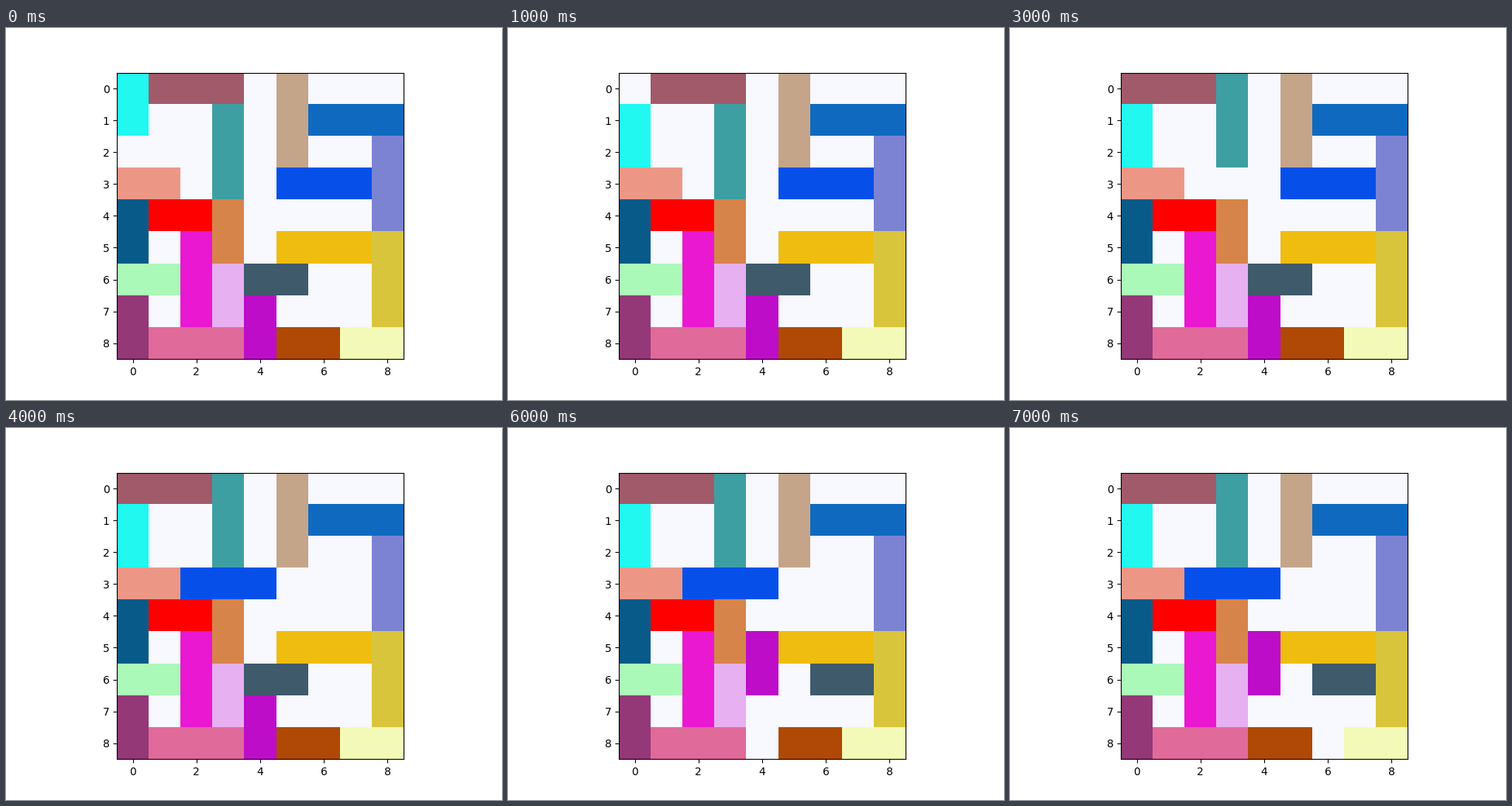
A matplotlib script that plays this animation: 640x480 px, repeating every 8000 ms.

```python
import matplotlib.pyplot as plt
import numpy as np
from matplotlib.animation import FuncAnimation
from matplotlib.colors import to_rgb

SIZE = 9
FLOOR = "#f8f8ff"

# name: (row, column, length, direction, colour)
CARS = {
    "cyan": (0, 0, 2, "v", "#21f8f0"),
    "mauve": (0, 1, 3, "h", "#a15a69"),
    "tan": (0, 5, 3, "v", "#c4a589"),
    "teal": (1, 3, 3, "v", "#3e9fa2"),
    "azure": (1, 6, 3, "h", "#0f6abf"),
    "periwinkle": (2, 8, 3, "v", "#7c83d3"),
    "salmon": (3, 0, 2, "h", "#ec9786"),
    "blue": (3, 5, 3, "h", "#0650e9"),
    "navy": (4, 0, 2, "v", "#085a89"),
    "red": (4, 1, 2, "h", "#ff0000"),
    "orange": (4, 3, 2, "v", "#d7844a"),
    "magenta": (5, 2, 3, "v", "#ea18d0"),
    "gold": (5, 5, 3, "h", "#efbc10"),
    "yellow": (5, 8, 3, "v", "#d9c53b"),
    "mint": (6, 0, 2, "h", "#abf9b8"),
    "lavender": (6, 3, 2, "v", "#e7b0f0"),
    "slate": (6, 4, 2, "h", "#3e5a6b"),
    "plum": (7, 0, 2, "v", "#943877"),
    "purple": (7, 4, 2, "v", "#bd0dc8"),
    "pink": (8, 1, 3, "h", "#e06a9a"),
    "brown": (8, 5, 2, "h", "#af4905"),
    "cream": (8, 7, 2, "h", "#f3fab8"),
}

# One car slides along its own direction at each step.
MOVES = [
    ("cyan", 1),
    ("mauve", -1),
    ("teal", -1),
    ("blue", -3),
    ("slate", 2),
    ("purple", -2),
    ("brown", -1),
]


def board(step):
    shift = dict(MOVES[:step])
    grid = np.full((SIZE, SIZE, 3), to_rgb(FLOOR))
    for name, (row, col, length, direction, color) in CARS.items():
        offset = shift.get(name, 0)
        if direction == "h":
            col += offset
            grid[row, col:col + length] = to_rgb(color)
        else:
            row += offset
            grid[row:row + length, col] = to_rgb(color)
    return grid


fig, ax = plt.subplots(figsize=(6.4, 4.8), dpi=100)
image = ax.imshow(board(0))


def update(step):
    image.set_data(board(step))
    return [image]


anim = FuncAnimation(fig, update, frames=len(MOVES) + 1, interval=1000,
                     repeat=True, repeat_delay=0)
plt.show()
```
